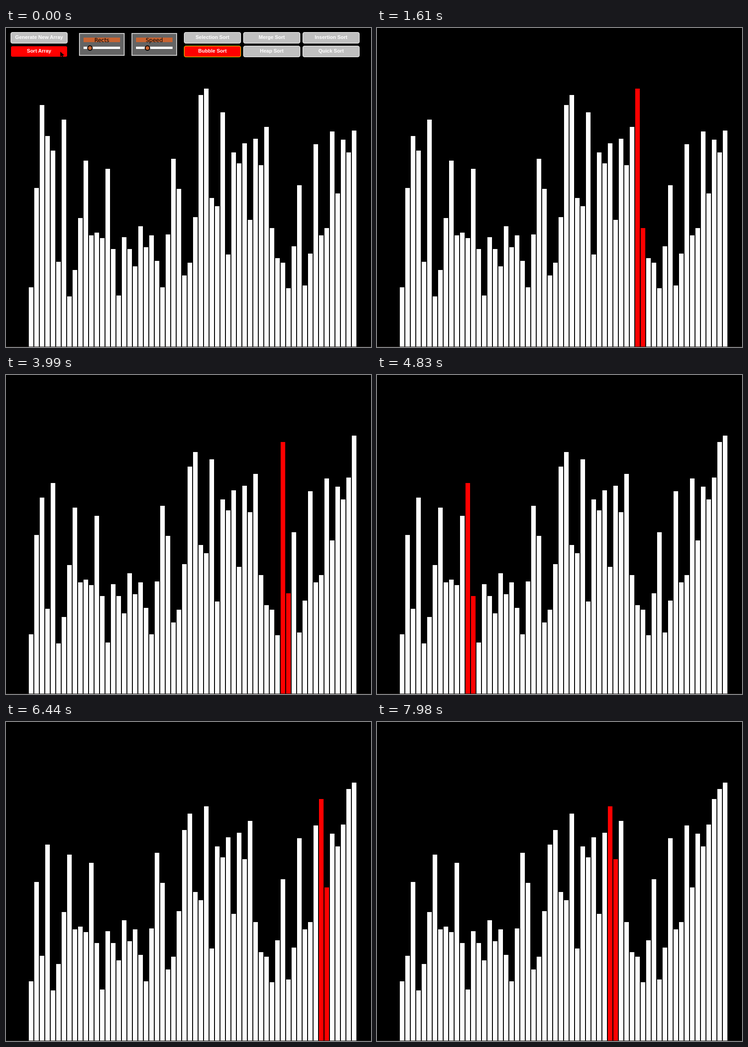
These frames come from a looping animation (800x700 px, 8000 ms). An HTML page:

```html
<!DOCTYPE html>
<html lang="en">
<head>
<meta charset="utf-8">
<title>Bubble sort</title>
<style>
  html, body { margin: 0; width: 100%; height: 100%; overflow: hidden; background: #000; }
  svg { position: absolute; left: 0; top: 0; width: 800px; height: 700px; }
  #controls div { position: absolute; box-sizing: border-box; text-align: center; white-space: nowrap; }
  #controls .button {
    width: 125px; height: 25px; border: 1px solid #fff; border-radius: 4px;
    background: #c0c0c0; color: #fff;
    font: bold 11px/20px "Liberation Sans", Arial, sans-serif;
  }
  #controls .start { background: #f00; border-color: #000; }
  #controls .chosen { background: #f00; border-color: #ff0; }
  #controls .slider { top: 11px; width: 100px; height: 50px; border: 2px solid #c8c8c8; background: #646464; }
  #controls .label {
    left: 8px; top: 8px; width: 80px; height: 10px; background: #c86432; color: #000;
    font: 12px/12px "DejaVu Sans", Verdana, sans-serif;
  }
  #controls .track { left: 8px; top: 28px; width: 80px; height: 5px; background: #fff; }
  #controls .knob {
    top: 25px; width: 12px; height: 12px; border: 2px solid #000; border-radius: 50%; background: #c86432;
  }
</style>
</head>
<body>
<svg viewBox="0 0 800 700">
  <rect y="699" width="800" height="1" fill="#26221f"/>
  <g id="bars" shape-rendering="crispEdges"></g>
</svg>
<div id="controls">
  <svg viewBox="0 0 800 700" style="z-index: 1">
    <path d="M119 52v11l3-2 1.5 3 2-1-1.5-3h4z"/>
  </svg>
</div>
<script>
const LOOP = 8000, TICK = 70;
const SWAP_MS = 41.5, LEAD_MS = 76.7;
const FLOOR = 699, UNIT = 2;

// The unsorted numbers, the only input of the sort
const values = [
  65, 174, 265, 231, 215, 93, 249, 55, 84, 141, 204, 122, 125, 119, 195,
  107, 56, 120, 107, 88, 132, 109, 122, 94, 65, 123, 206, 173, 78, 92,
  142, 276, 283, 163, 154, 257, 101, 213, 201, 223, 139, 228, 199, 241, 130,
  97, 92, 64, 110, 177, 67, 102, 222, 122, 130, 236, 168, 227, 213, 237
];

const controls = document.getElementById('controls');

function box(parent, className, style, text = '') {
  const node = document.createElement('div');
  node.className = className;
  node.textContent = text;
  Object.assign(node.style, style);
  return parent.appendChild(node);
}

function button(x, y, label, state = '') {
  box(controls, `button ${state}`, { left: `${x}px`, top: `${y}px` }, label);
}

function slider(x, label, knob) {
  const panel = box(controls, 'slider', { left: `${x}px` });
  box(panel, 'label', {}, label);
  box(panel, 'track', {});
  box(panel, 'knob', { left: `${knob}px` });
}

button(10, 9, 'Generate New Array');
button(10, 39, 'Sort Array', 'start');
slider(160, 'Rects', 16);
slider(275, 'Speed', 27);
[['Selection', 'Bubble'], ['Merge', 'Heap'], ['Insertion', 'Quick']].forEach((names, col) =>
  names.forEach((name, row) =>
    button(390 + 130 * col, 9 + 30 * row, `${name} Sort`, name === 'Bubble' ? 'chosen' : '')));

const barGroup = document.getElementById('bars');
const bars = values.map((_, i) => {
  const bar = document.createElementNS(barGroup.namespaceURI, 'rect');
  bar.setAttribute('x', 50 + 12 * i);
  bar.setAttribute('width', 10);
  return barGroup.appendChild(bar);
});

// Runs the sort up to its nth swap, which is found but not yet made
function sortUntil(n) {
  const list = values.slice();
  for (let end = list.length - 1; n > 0 && end > 0; end--) {
    for (let j = 0; j < end; j++) {
      if (list[j] <= list[j + 1]) continue;
      if (--n === 0) return { list, active: j };
      [list[j], list[j + 1]] = [list[j + 1], list[j]];
    }
  }
  return { list, active: -2 };
}

function draw(tick) {
  const swap = tick ? Math.floor((tick * TICK + LEAD_MS) / SWAP_MS) : 0;
  const { list, active } = sortUntil(swap);
  bars.forEach((bar, i) => {
    const height = list[i] * UNIT;
    bar.setAttribute('y', FLOOR - height);
    bar.setAttribute('height', height);
    bar.setAttribute('fill', i === active || i === active + 1 ? '#f00' : '#fff');
  });
  controls.style.visibility = tick ? 'hidden' : 'visible';
}

const start = performance.now();
let shown = -1;
function frame() {
  const tick = Math.floor((performance.now() - start) % LOOP / TICK);
  if (tick !== shown) draw(shown = tick);
  requestAnimationFrame(frame);
}
frame();
</script>
</body>
</html>
```
